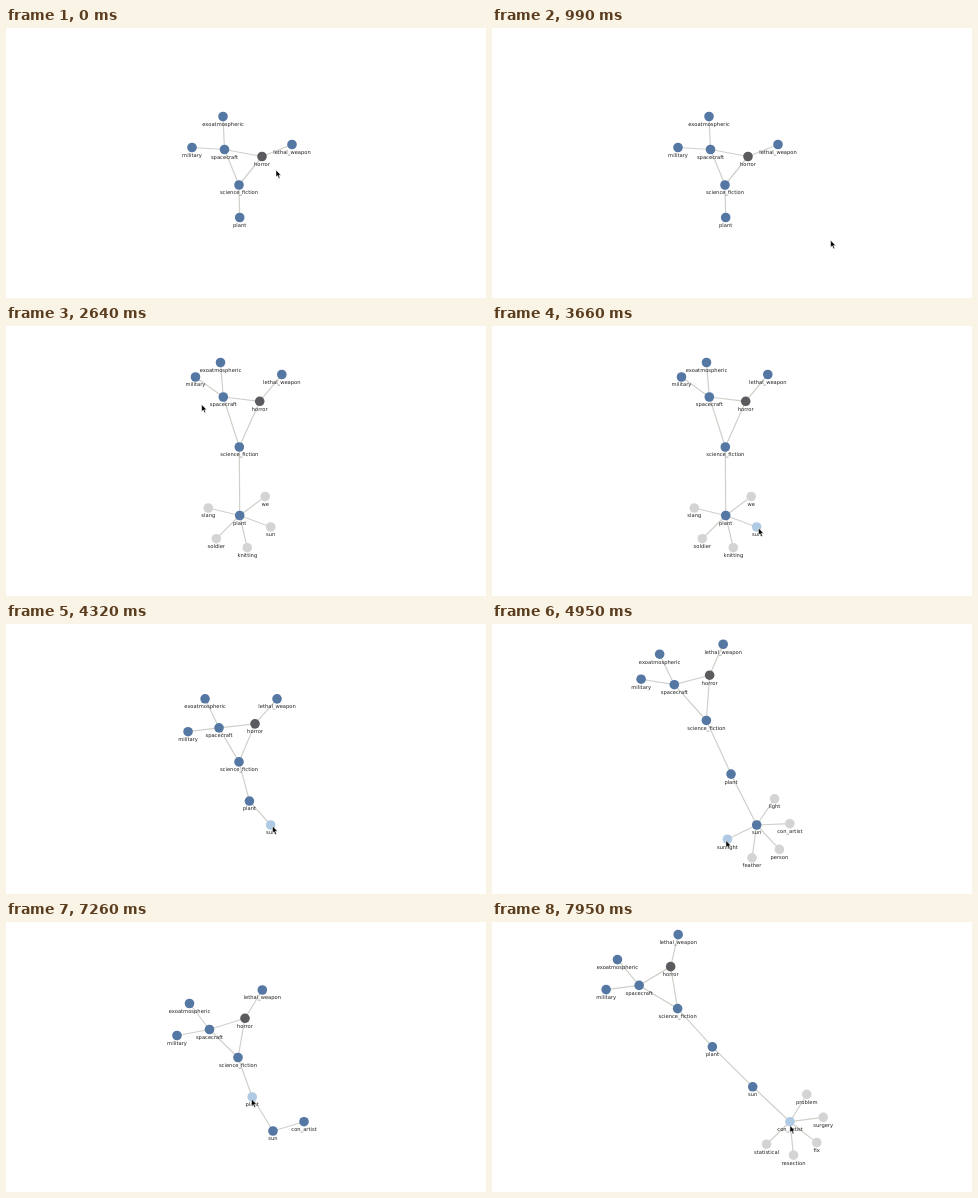
An HTML page for the animation above (8000 ms loop, 480 px wide and 270 px high).

```html
<!DOCTYPE html>
<html lang="en">
<head>
<meta charset="utf-8">
<title>Word graph</title>
<style>
  html, body { margin: 0; width: 100%; height: 100%; overflow: hidden; background: #fff; }
  svg { display: block; width: 100vw; height: 100vh; }
  line { stroke: #d0d0ca; stroke-width: 1.2; }
  text { font: 5.2px "DejaVu Sans", Verdana, sans-serif; text-anchor: middle; fill: #222; }
</style>
</head>
<body>
<svg viewBox="0 0 480 270">
  <g id="links"></g>
  <g id="dots"></g>
  <g id="labels"></g>
  <path id="cursor" d="M0 0V7L1.6 5.6L2.8 8.4L4 7.9L2.9 5.2H5Z" fill="#000" stroke="#fff" stroke-width=".5"/>
</svg>
<script>
const LOOP = 8000, TAU = 110, RADIUS = 4.8;
const BLUE = '#5577a3', ROOT = '#5b5b5f', PALE = '#d4d4d4', HOVER = '#b0cae3';

const chain = ['exoatmospheric', 'military', 'spacecraft', 'horror', 'lethal_weapon',
  'science_fiction', 'plant', 'sun', 'con_artist'];

// Settled layouts, in the order of chain; an unborn node sits on its parent.
const layouts = {
  start: [[217,88.5], [186,119.5], [218.5,121.5], [256,128.5], [286,116.5], [233,157], [233.7,189.5], [233.7,189.5], [233.7,189.5]],
  plantOpen: [[214.5,36.5], [189.5,51], [217.3,71], [253.7,75.3], [275.8,48.5], [233.3,121], [233.7,189.5], [264.7,201], [264.7,201]],
  sunPicked: [[199,75], [182,108], [213,104], [249,100], [271,75], [233,138], [243.5,177], [264.7,201], [264.7,201]],
  sunOpen: [[167.5,30], [149,55], [182.2,60.5], [217.5,51], [231,20], [214.3,96.3], [239,150], [264.7,201], [298,199.7]],
  artistPicked: [[183.5,81.5], [171,113.5], [203.5,107.5], [239,96.3], [256.3,68], [232,135.5], [246.2,175], [267,209], [298,199.7]],
  artistOpen: [[125.3,37.5], [114,67.5], [147,63.3], [178.5,44.5], [186,12.5], [185.5,86.5], [220.3,124.7], [260.7,164.7], [298,199.7]]
};

const PLANT_OPEN = 1660, SUN_PICK = 3740, SUN_OPEN = 4350, ARTIST_PICK = 6295, ARTIST_OPEN = 7690;

// Time, layout, gain: the last move is cut off before it settles.
const moves = [
  [-1e5, 'start', 1],
  [PLANT_OPEN, 'plantOpen', 1],
  [SUN_PICK, 'sunPicked', 1],
  [SUN_OPEN, 'sunOpen', 1],
  [ARTIST_PICK, 'artistPicked', 1],
  [ARTIST_OPEN, 'artistOpen', 1.1]
];

const groups = [
  { parent: 'plant', from: [233.7,189.5], born: PLANT_OPEN, dies: SUN_PICK, gain: 1,
    kids: { we: [259.2,170.5], slang: [202.3,182], soldier: [210.3,212.7], knitting: [241.3,221.7] } },
  { parent: 'sun', from: [264.7,201], born: SUN_OPEN, dies: ARTIST_PICK, gain: 1,
    kids: { light: [282.7,174.7], sunlight: [235.3,215.3], feather: [260,234], person: [287.5,225.5] } },
  { parent: 'con_artist', from: [298,199.7], born: ARTIST_OPEN, dies: 1e5, gain: 1.1,
    kids: { problem: [314.8,172.2], surgery: [331.3,195.3], fix: [324.8,220.7], resection: [301.5,233.3], statistical: [274.5,222.3] } }
];

const pairs = [['exoatmospheric','spacecraft'], ['military','spacecraft'], ['spacecraft','horror'],
  ['horror','lethal_weapon'], ['spacecraft','science_fiction'], ['horror','science_fiction'],
  ['science_fiction','plant'], ['plant','sun'], ['sun','con_artist']];

const pointer = [
  [60, 270,142], [300, 258,116], [550, 210,165], [840, 292,218],
  [1150, 389,206], [1560, 233,193], [2460, 233,193],
  [2700, 189,58], [3000, 448,256], [3270, 291,240],
  [3330, 291,240], [3640, 266.5,202], [4400, 266.5,202],
  [4800, 234,216.5], [5100, 234,216.5], [5400, 260,236],
  [5880, 299.5,200], [6850, 299.5,200],
  [7000, 257,69], [7120, 189,100], [7250, 245.5,177],
  [7380, 245.5,177], [7590, 298,203.5]
];

const settle = dt => dt <= 0 ? 0 : 1 - Math.exp(-dt / TAU);
const mix = (a, b, p) => [a[0] + (b[0] - a[0]) * p, a[1] + (b[1] - a[1]) * p];

function make(tag, box) {
  const el = document.createElementNS('http://www.w3.org/2000/svg', tag);
  document.getElementById(box).append(el);
  return el;
}
function set(el, attrs) {
  for (const k in attrs) el.setAttribute(k, attrs[k]);
}

const nodes = {}, links = [];
function addNode(name, info) {
  const node = nodes[name] = { born: -1e5, dies: 1e5, picked: -1e5, color: BLUE, ...info };
  node.dot = make('circle', 'dots');
  node.label = make('text', 'labels');
  node.label.textContent = name;
  set(node.dot, { r: RADIUS });
}
function addLink(a, b) {
  links.push({ a: nodes[a], b: nodes[b], el: make('line', 'links') });
}

for (const name of chain) addNode(name, {});
nodes.horror.color = ROOT;
Object.assign(nodes.sun, { born: PLANT_OPEN, picked: SUN_PICK });
Object.assign(nodes.con_artist, { born: SUN_OPEN, picked: ARTIST_PICK });
for (const [a, b] of pairs) addLink(a, b);
for (const g of groups) {
  for (const name in g.kids) {
    addNode(name, { ...g, to: g.kids[name], picked: 1e5 });
    addLink(g.parent, name);
  }
}

function pointerAt(t) {
  const i = pointer.findIndex(k => k[0] > t);
  if (i === 0) return pointer[0].slice(1);
  if (i < 0) return pointer[pointer.length - 1].slice(1);
  const [t0, ...a] = pointer[i - 1], [t1, ...b] = pointer[i];
  const u = (t - t0) / (t1 - t0);
  return mix(a, b, u * u * (3 - 2 * u));
}

function placeNodes(t) {
  const i = moves.filter(m => m[0] <= t).length - 1;
  const [start, name, gain] = moves[i];
  const before = layouts[moves[Math.max(0, i - 1)][1]];
  const p = settle(t - start) * gain;
  chain.forEach((word, n) => { nodes[word].pos = mix(before[n], layouts[name][n], p); });
  for (const node of Object.values(nodes)) {
    const grown = settle(t - node.born);
    if (node.to) node.pos = mix(node.from, node.to, grown * node.gain);
    node.alpha = Math.min(1, grown * (node.gain || 1)) * (1 - settle(t - node.dies));
    if (node.alpha < .01) node.alpha = 0;
  }
}

function draw(t) {
  const [cx, cy] = pointerAt(t);
  placeNodes(t);
  for (const node of Object.values(nodes)) {
    const [x, y] = node.pos;
    const over = node.alpha > 0 && Math.hypot(x - cx, y - cy) < RADIUS + .3;
    const fill = over ? HOVER : t < node.picked ? PALE : node.color;
    set(node.dot, { cx: x, cy: y, fill, opacity: node.alpha });
    set(node.label, { x, y: y + 9.4, opacity: node.alpha });
  }
  for (const { a, b, el } of links) {
    set(el, { x1: a.pos[0], y1: a.pos[1], x2: b.pos[0], y2: b.pos[1], opacity: Math.min(a.alpha, b.alpha) });
  }
  set(document.getElementById('cursor'), { transform: `translate(${cx} ${cy})` });
}

const began = performance.now();
function tick() {
  draw((performance.now() - began) % LOOP);
  requestAnimationFrame(tick);
}
tick();
</script>
</body>
</html>
```
